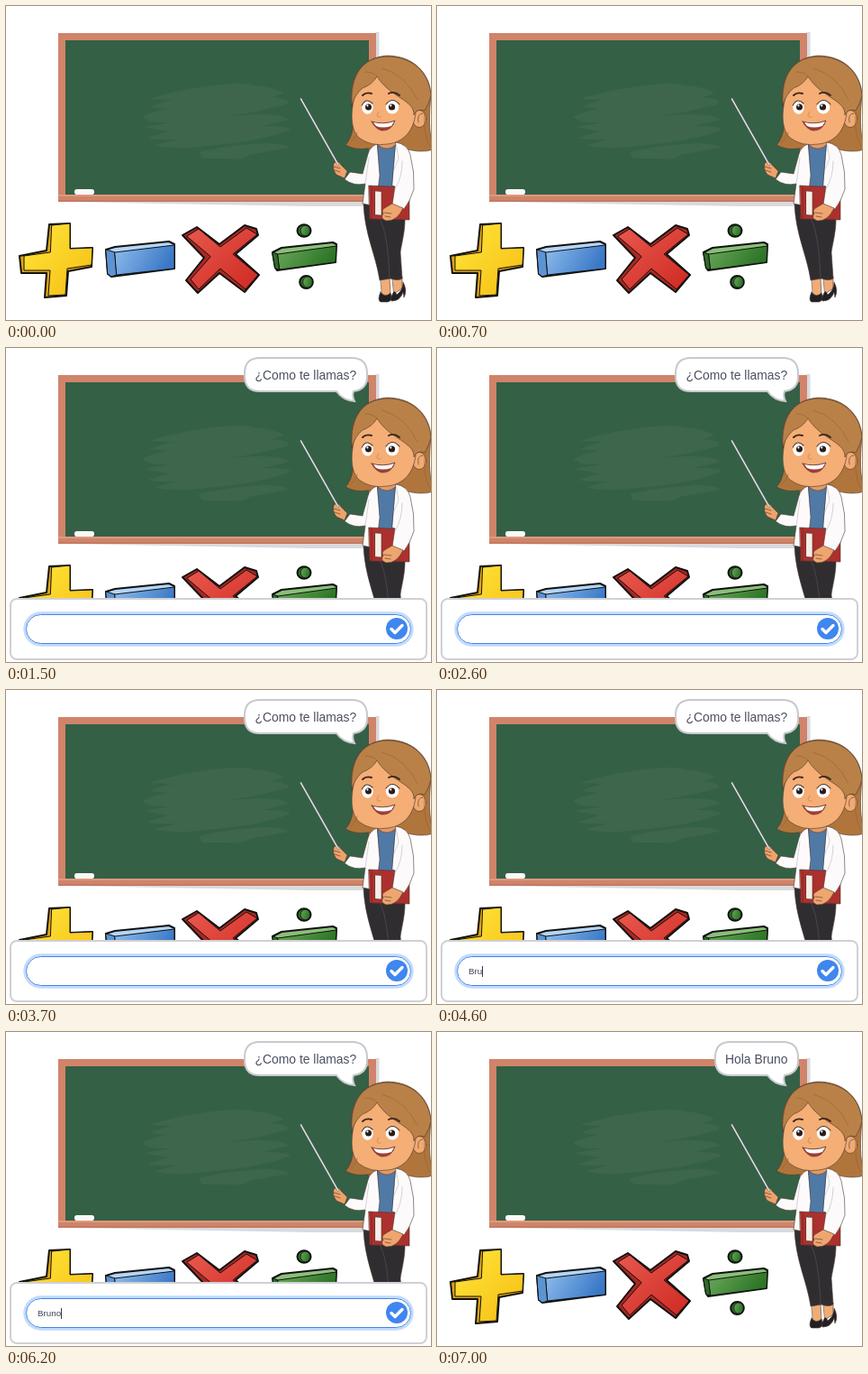
Animation of 472 by 348 pixels, one loop 8000 ms. Source, as an HTML page:

```html
<!DOCTYPE html>
<html lang="es">
<head>
<meta charset="utf-8">
<title>Pizarra</title>
<style>
html, body { margin: 0; width: 100%; height: 100%; overflow: hidden; background: #fff; }
.stage { position: relative; width: 472px; height: 348px; overflow: hidden; font-family: "Liberation Sans", Arial, sans-serif; }
svg { position: absolute; left: 0; top: 0; }
.ink { stroke: #111; stroke-width: 2; stroke-linejoin: round; stroke-linecap: round; }
.thin { stroke: #4a372c; stroke-width: .6; stroke-linejoin: round; stroke-linecap: round; }
.say { font-size: 13.9px; fill: #4b4f62; }
.bubble { fill: #fff; stroke: #c8c9ce; stroke-width: 2; }

.ask, .answer { visibility: hidden; animation: ask 8s step-end infinite; }
.answer { animation-name: answer; }
@keyframes ask { 0% { visibility: hidden } 9.75% { visibility: visible } 79.4% { visibility: hidden } }
@keyframes answer { 0% { visibility: hidden } 79.4% { visibility: visible } }

.panel { position: absolute; left: 4px; top: 277px; width: 460px; height: 65px; border: 2px solid #d0d0d4; border-radius: 8px; background: #fff; }
.field { position: absolute; left: 16px; top: 16px; width: 426px; height: 31px; border: 1px solid #d9d9d9; border-radius: 17px; animation: focus 8s infinite; }
@keyframes focus {
  0%, 9.75% { border-color: #c4c6de; box-shadow: 0 0 0 0 rgba(76,151,255,.35); animation-timing-function: ease; }
  12.875%, 100% { border-color: #4584e4; box-shadow: 0 0 0 2.7px rgba(76,151,255,.35); }
}
.typed { position: absolute; left: 12px; top: 0; height: 31px; line-height: 32px; font-size: 9.75px; color: #404456; white-space: nowrap; display: flex; align-items: center; }
.typed span { animation: key 8s step-end calc(var(--i) * 150ms) infinite backwards; }
@keyframes key { 0% { font-size: 0 } 53.1% { font-size: 9.75px } }
.caret { width: 1px; height: 12px; margin-right: -1px; background: #333a50; animation: blink 8s step-end infinite; }
@keyframes blink {
  0%, 22.5%, 35%, 47.5%, 73.75% { opacity: 1 }
  16.25%, 28.75%, 41.25%, 67.5% { opacity: 0 }
}
.ok { left: 416px; top: 20px; }
</style>
</head>
<body>
<div class="stage">
<svg width="472" height="348" viewBox="0 0 472 348">
  <defs>
    <linearGradient id="yellow" x2="1" y2="1"><stop stop-color="#ffe63a"/><stop offset="1" stop-color="#f6bd14"/></linearGradient>
    <linearGradient id="blue" x2="1" y2=".3"><stop stop-color="#8fbdee"/><stop offset="1" stop-color="#3a78c6"/></linearGradient>
    <linearGradient id="red" x2="1" y2="1"><stop stop-color="#e8584e"/><stop offset="1" stop-color="#cf2a22"/></linearGradient>
    <linearGradient id="green" x2="1" y2=".3"><stop stop-color="#6aa85a"/><stop offset="1" stop-color="#2c7426"/></linearGradient>
  </defs>

  <g id="board">
    <path fill="#d9dadd" d="M411 29H414.5V222H335L70 217Z"/>
    <path fill="#d08469" d="M58 30H411V217H58Z"/>
    <path fill="#346046" d="M66 38H403V209H66Z"/>
    <path fill="#dd9a80" d="M58 209H411V211H58Z"/>
    <path fill="#c1775d" d="M58 215.5H411V217H58Z"/>
    <g fill="#54785f" opacity=".28">
      <path d="M158 103Q205 89 250 86Q270 85 274 88Q300 90 308 97L295 101Q318 103 312 109L282 116Q240 124 215 126Q185 131 160 128L151 123Q165 116 180 114L160 112Q172 106 186 104Z"/>
      <path d="M152 134Q210 124 276 120Q305 119 315 126L285 133Q314 133 316 137Q292 147 252 152L205 157Q175 158 166 154L190 148Q162 149 158 146L180 139Z"/>
      <path d="M214 162Q245 154 290 152Q312 153 314 157L270 165Q265 171 245 169L218 169Z"/>
    </g>
    <rect x="76" y="203" width="22" height="6" rx="2.8" fill="#fafafa"/>
  </g>

  <g id="plus" class="ink">
    <path fill="#e0a512" d="M48 242L71 241L71 269L96 268L95 289L69 294L67 321L43 323L45 296L17 296L15 277L45 271Z"/>
    <path fill="url(#yellow)" stroke-width="1" d="M51 243L71 241L71 269L96 268L95 287L68 291L66 320L47 321L49 293L20 293L20 277L49 273Z"/>
  </g>
  <g id="minus" class="ink">
    <path fill="#b4d5f5" d="M111 270L121 267L181 261L187 264L187 291L117 300L113 297Z"/>
    <path fill="#5c93d2" stroke-width="1" d="M111 270L121 273L123 298L117 300L113 297Z"/>
    <path fill="url(#blue)" stroke-width="1" d="M121 273L187 265L187 291L123 298Z"/>
  </g>
  <g id="times" class="ink">
    <path fill="#a92822" d="M196 254L212 245L237 264L265 243L278 247L280 254L255 275L281 298L265 317L237 296L213 318L200 304L220 279Z"/>
    <path fill="url(#red)" stroke-width="1" d="M201 255L214 247L238 267L267 246L279 253L252 275L280 298L266 314L238 291L214 314L205 303L227 278Z"/>
  </g>
  <g id="divide" class="ink">
    <path fill="#8abf78" d="M296 273L306 268L363 262L367 264L366 284L301 293L299 290Z"/>
    <path fill="#2d6c27" stroke-width="1" d="M296 273L302 275L304 292L299 291Z"/>
    <path fill="url(#green)" stroke-width="1" d="M302 275L367 266L366 284L304 292Z"/>
    <ellipse cx="331" cy="249" rx="7.5" ry="6.7" fill="#2d6c27"/>
    <ellipse cx="332.5" cy="249" rx="5.3" ry="5.7" fill="url(#green)" stroke-width=".7"/>
    <ellipse cx="333.5" cy="306" rx="7.3" ry="7" fill="#2d6c27"/>
    <ellipse cx="335" cy="306" rx="5.3" ry="6" fill="url(#green)" stroke-width=".7"/>
  </g>

  <g id="teacher" class="thin">
    <path fill="#f0ac76" d="M416 300H426L427 321L418 324ZM429 300H440L440 313L431 319Z"/>
    <path fill="#222025" d="M416 317Q421 324 427 318Q430 327 424 328H416Q412 326 416 317ZM429 320Q431 313 434 320Q441 315 441 306Q446 315 442 323L441 317Q438 327 428 327Q426 323 429 320Z"/>
    <path fill="#302d31" d="M397 218H440C447 238 440 259 438 273L440 302Q435 305 427 302L415 304C411 276 398 253 397 218Z"/>
    <path fill="none" stroke="#59555a" d="M414 234Q424 248 426 302"/>
    <path fill="#b0753c" d="M384 106C381 76 397 57 423 55C453 55 471 75 472 99C470 121 469 139 475 159Q459 164 440 157L400 158Q388 160 377 154C386 145 388 126 384 106Z"/>
    <path fill="#e29a66" d="M413 145H433L435 159L424 168L412 157Z"/>
    <path fill="#5079a6" d="M413 154Q423 163 434 153L435 203H412Z"/>
    <path fill="#fcfafa" d="M412 153Q404 156 402 164L396 186L382 184L376 192Q386 200 399 197L396 219L411 222L415 188Z"/>
    <path fill="none" stroke="#b8b8bc" d="M403 168L399 197"/>
    <path fill="#eea26b" d="M364 174Q369 170 372 176L379 183L376 191L367 187Q362 181 364 174Z"/>
    <path fill="none" d="M364 178L371 180M365 182L371 184"/>
    <path fill="none" stroke="#65656a" stroke-width="2.2" d="M327.5 103L369 176"/>
    <path fill="none" stroke="#e4e4e6" stroke-width="1.5" d="M327.5 103L369 176"/>
    <path fill="#ac302d" d="M403 199L448 201V237L404 236Z"/>
    <path fill="#f6eee8" d="M410 205L417 205.5V232L410 231.5Z"/>
    <path fill="none" stroke="#7d201f" d="M406 200V236"/>
    <path fill="#fcfafa" d="M433 151Q446 153 449 165Q454 184 453 203Q449 216 442 225L429 220L432 200L429 199Z"/>
    <path fill="none" stroke="#b8b8bc" d="M440 172Q440 190 432 203M433 152L436 169L431 181"/>
    <path fill="#efa56e" d="M429 219L441 224Q434 239 422 238Q415 235 419 230Q416 226 422 223Z"/>
    <path fill="none" d="M420 229L428 230M421 233L427 234"/>
    <ellipse cx="459" cy="125" rx="7.5" ry="9.5" fill="#f1aa72"/>
    <path fill="none" d="M463 119Q456 119 458 129"/>
    <path fill="#f4ae76" d="M389 92C383 114 381 135 392 146Q405 156 424 153C441 151 453 139 455 118Q454 99 439 87L416 74Z"/>
    <path fill="#b98148" d="M384 110C382 76 396 57 423 56C451 56 470 73 472 99Q470 108 465 116Q456 113 453 121C454 104 427 102 412 78Q407 87 396 91Q388 97 384 110Z"/>
    <path fill="none" stroke="#946035" d="M412 78Q408 73 399 73M418 69Q444 76 457 104M465 118Q463 143 471 156M383 151Q390 144 390 140"/>
    <path fill="none" stroke="#3a241a" stroke-width="1.9" d="M396 99Q400 95 406 97M425 97Q431 94 437 99"/>
    <g id="eyes" stroke="none">
      <ellipse cx="401.5" cy="112.3" rx="6.3" ry="7.5" fill="#fff"/>
      <ellipse cx="429" cy="112" rx="7.3" ry="7.5" fill="#fff"/>
      <circle cx="402.5" cy="112" r="3.5" fill="#2b1c18"/>
      <circle cx="428.5" cy="112" r="3.6" fill="#2b1c18"/>
      <circle cx="401.4" cy="110.4" r="1.1" fill="#fff"/>
      <circle cx="427.3" cy="110.4" r="1.1" fill="#fff"/>
    </g>
    <path fill="none" stroke-width="1.1" d="M395.3 110Q400 101 407 108M422 109Q429 100 437 109"/>
    <path fill="none" stroke="#c47545" d="M414 117Q409 124 416 123"/>
    <path fill="#a83a36" d="M406 128Q419 132 432 127Q428 139 417 138Q410 136 406 128Z"/>
    <path fill="#fff" stroke="none" d="M408 129Q420 132 431 128L428 133Q418 136 411 133Z"/>
  </g>

  <g class="ask">
    <path class="bubble" d="M282 11H384Q401 11 401 28V32Q401 46 386 48Q384 53 387 59Q374 58 367 48H282Q265 48 265 31V28Q265 11 282 11Z"/>
    <text class="say" x="276.5" y="35">¿Como te llamas?</text>
  </g>
  <g class="answer">
    <path class="bubble" d="M326 11H384Q401 11 401 28V32Q401 46 386 48Q384 53 387 59Q374 58 367 48H326Q309 48 309 31V28Q309 11 326 11Z"/>
    <text class="say" x="320" y="35">Hola Bruno</text>
  </g>
</svg>

<div class="panel ask">
  <div class="field">
    <div class="typed"><span style="--i:0">B</span><span style="--i:1">r</span><span style="--i:2">u</span><span style="--i:3">n</span><span style="--i:4">o</span><i class="caret"></i></div>
  </div>
  <svg class="ok" width="25" height="25" viewBox="0 0 25 25">
    <circle cx="12" cy="12" r="12" fill="#4086ef"/>
    <path fill="none" stroke="#fff" stroke-width="3.4" stroke-linecap="round" stroke-linejoin="round" d="M6 12.5L10 16.5L18 8.5"/>
  </svg>
</div>
</div>
</body>
</html>
```
